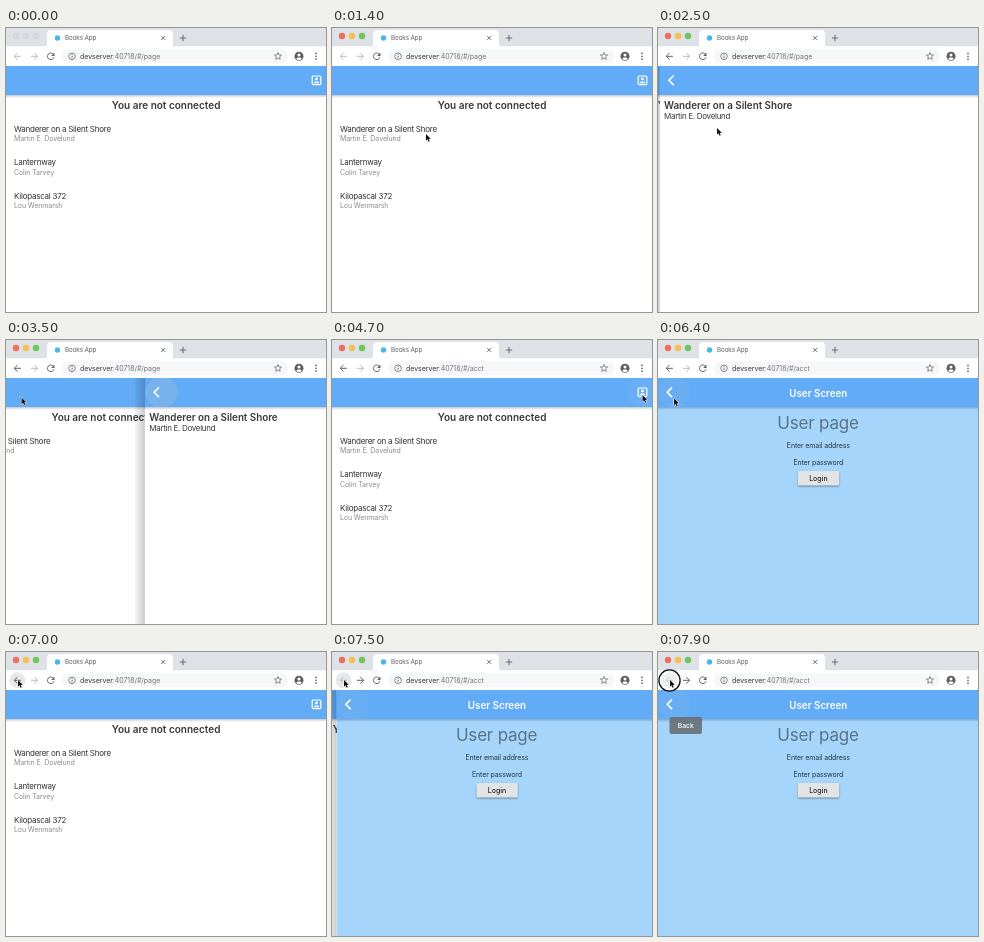
Animation, 320 px wide and 284 px high, one loop 8 s. Source, as an HTML page with a canvas:

```html
<!DOCTYPE html>
<html lang="en">
<head>
<meta charset="utf-8">
<title>Books App</title>
<style>
html, body { margin: 0; width: 100%; height: 100%; overflow: hidden; background: #fff; }
canvas { display: block; width: 320px; height: 284px; }
</style>
</head>
<body>
<canvas id="stage"></canvas>
<script>
const W = 320, H = 284, LOOP = 8000, STEP = 100;
const BAR_TOP = 38, BAR_H = 29;
const BLUE = '#62abf6', SKY = '#a6d5fc';
const canvas = document.getElementById('stage');
const dpr = window.devicePixelRatio || 1;
canvas.width = W * dpr;
canvas.height = H * dpr;
const c = canvas.getContext('2d');

const books = [
  ['Wanderer on a Silent Shore', 'Martin E. Dovelund'],
  ['Lanternway', 'Colin Tarvey'],
  ['Kilopascal 372', 'Lou Wenmarsh']
];

// Pointer stops: time, x, y
const stops = [
  [0, 160, 300], [100, 159, 274], [300, 152, 153], [500, 152, 153],
  [800, 132, 97], [900, 132, 97], [1400, 94, 106], [1800, 94, 106],
  [2100, 59, 100], [2700, 59, 100], [3200, 15.5, 57.5], [3600, 15.5, 57.5],
  [4000, 297, 74], [4100, 297, 74], [4400, 310.5, 55], [4900, 310.5, 55],
  [5300, 168, 62], [5400, 168, 62], [5900, 16, 58.5], [6500, 16, 58.5],
  [6900, 12, 28], [8000, 12, 28]
];

// Page visits: entry start, entry length, exit start, exit length
const visits = [
  { draw: detailPage, at: 2330, len: 190, out: 3433, outLen: 400 },
  { draw: userPage, at: 4750, len: 450, out: 6430, outLen: 400 },
  { draw: userPage, at: 7150, len: 450, out: 9000, outLen: 400 }
];

const within = (t, a, b) => t >= a && t < b;

// cubic-bezier(.35, .91, .33, .97)
function slide(s) {
  if (s <= 0) return 0;
  if (s >= 1) return 1;
  const axis = (u, a, b) => 3 * a * u * (1 - u) ** 2 + 3 * b * u * u * (1 - u) + u ** 3;
  let lo = 0, hi = 1;
  for (let i = 0; i < 20; i++) {
    const mid = (lo + hi) / 2;
    if (axis(mid, .35, .33) < s) lo = mid; else hi = mid;
  }
  return axis(lo, .91, .97);
}

function pointerAt(t) {
  let i = 1;
  while (i < stops.length - 1 && stops[i][0] <= t) i++;
  const [t0, x0, y0] = stops[i - 1], [t1, x1, y1] = stops[i];
  const s = (t - t0) / (t1 - t0), e = s * s * (3 - 2 * s);
  return [x0 + (x1 - x0) * e, y0 + (y1 - y0) * e];
}

function text(str, x, y, size, color, { weight = 400, gap = 0, align = 'left' } = {}) {
  c.font = `${weight} ${size}px Inter, "Open Sans", sans-serif`;
  c.letterSpacing = gap + 'px';
  c.textAlign = align;
  c.fillStyle = color;
  c.fillText(str, x, y);
  return c.measureText(str).width;
}

function rect(x, y, w, h, color) {
  c.fillStyle = color;
  c.fillRect(x, y, w, h);
}

function pill(x, y, w, h, r, color) {
  c.beginPath();
  c.roundRect(x, y, w, h, r);
  c.fillStyle = color;
  c.fill();
}

function disc(x, y, r, color) {
  c.beginPath();
  c.arc(x, y, r, 0, 7);
  c.fillStyle = color;
  c.fill();
}

function ring(x, y, r, color, width, from = 0, to = Math.PI * 2) {
  c.beginPath();
  c.arc(x, y, r, from, to);
  c.strokeStyle = color;
  c.lineWidth = width;
  c.stroke();
}

function line(color, width, ...pts) {
  c.beginPath();
  for (let i = 0; i < pts.length; i += 2) c.lineTo(pts[i], pts[i + 1]);
  c.strokeStyle = color;
  c.lineWidth = width;
  c.stroke();
}

function arrow(x, y, dir, color) {
  line(color, 1, x - 3.4 * dir, y, x + 3.2 * dir, y);
  line(color, 1, x, y - 3.3, x + 3.3 * dir, y, x, y + 3.3);
}

function star(x, y, r) {
  const pts = [];
  for (let i = 0; i <= 10; i++) {
    const a = i * Math.PI / 5 - Math.PI / 2, d = i % 2 ? r * .45 : r;
    pts.push(x + d * Math.cos(a), y + d * Math.sin(a));
  }
  line('#6b6f74', .8, ...pts);
}

function browser(t) {
  const active = t >= 1100;
  const ink = '#5c6065', faint = '#b9bcc0';
  rect(0, 0, W, 18.5, '#dee1e6');
  const lights = active ? ['#ee6d62', '#f3c04f', '#6cc65c'] : ['#d5d8dc', '#d5d8dc', '#d5d8dc'];
  lights.forEach((color, i) => {
    disc(10 + i * 10, 8, 3.2, color);
    if (!active) ring(10 + i * 10, 8, 3, '#cdd0d4', .5);
  });
  pill(41, 2, 126, 20, [4, 4, 0, 0], '#fff');
  disc(51.5, 10, 2.7, '#47b8ec');
  text('Books App', 59, 12.3, 6.3, '#5a5d61', { gap: -.1 });
  line(ink, .9, 155.2, 7.9, 159.2, 11.9);
  line(ink, .9, 159.2, 7.9, 155.2, 11.9);
  line(ink, .9, 173.8, 10, 180.2, 10);
  line(ink, .9, 177, 6.8, 177, 13.2);

  rect(0, 18.5, W, BAR_TOP - 18.5, '#fff');
  if (t >= 6800) disc(11.5, 28.3, 8, '#e6e8ea');
  arrow(11.5, 28.3, -1, within(t, 2400, 7200) ? ink : faint);
  arrow(28.3, 28.3, 1, t >= 7200 ? ink : faint);
  ring(44.8, 28.3, 3.2, ink, 1, .3, 5.5);
  c.beginPath();
  c.moveTo(48.5, 24.5);
  c.lineTo(48.5, 28);
  c.lineTo(45.1, 28);
  c.fillStyle = ink;
  c.fill();

  pill(56, 21, 226, 14.5, 7.25, '#f6f7f8');
  ring(66, 28.3, 3.3, '#6b6f74', .8);
  rect(65.6, 27.7, .9, 2.5, '#6b6f74');
  rect(65.6, 26.2, .9, .9, '#6b6f74');
  const account = within(t, 4700, 6500) || t >= 7200;
  const w = text('devserver', 74, 30.8, 7, '#3b3d40', { gap: -.05 });
  text(':40718/#/' + (account ? 'acct' : 'page'), 74 + w, 30.8, 7, '#6f7378', { gap: -.05 });
  star(272, 28.3, 3.8);

  disc(293, 28.3, 4.5, '#5c6065');
  disc(293, 26.9, 1.5, '#fff');
  c.beginPath();
  c.ellipse(293, 30.7, 2.6, 1.3, 0, 0, 7);
  c.fillStyle = '#fff';
  c.fill();
  for (const dy of [-2.9, 0, 2.9]) disc(310, 28.3 + dy, .85, '#5c6065');
}

function appBar() {
  const bottom = BAR_TOP + BAR_H;
  const g = c.createLinearGradient(0, bottom, 0, bottom + 3);
  g.addColorStop(0, 'rgba(0,0,0,.22)');
  g.addColorStop(1, 'rgba(0,0,0,0)');
  rect(0, bottom, W, 3, g);
  rect(0, BAR_TOP, W, BAR_H, BLUE);
}

function chevron(glow) {
  if (glow) disc(16.5, 52.3, 16, `rgba(190,200,205,${glow})`);
  line('#fff', 1.6, 14, 47.5, 9.2, 52.3, 14, 57.1);
}

function listPage(t) {
  rect(0, BAR_TOP, W, H - BAR_TOP, '#fff');
  appBar();
  if (within(t, 4300, 5000)) disc(310.5, 52.3, 15, 'rgba(255,255,255,.05)');
  c.strokeStyle = '#fff';
  c.lineWidth = 1.2;
  c.beginPath();
  c.roundRect(306.2, 48, 8.6, 8.6, 1);
  c.stroke();
  disc(310.5, 51, 1.4, '#fff');
  pill(307.9, 53.4, 5.2, 1.9, [1.5, 1.5, 0, 0], '#fff');
  text('You are not connected', 160.1, 81, 10, '#37393b', { weight: 600, align: 'center' });
  books.forEach(([title, author], i) => {
    const y = 104 + i * 33.3;
    text(title, 8, y, 8, '#303030', { gap: -.24 });
    text(author, 8, y + 9.2, 7, '#8a8a8a', { gap: -.1 });
  });
}

function detailPage(t) {
  rect(0, BAR_TOP, W, H - BAR_TOP, '#fff');
  appBar();
  chevron(t >= 3100 ? .22 : 0);
  text(books[0][0], 4.3, 81, 9.8, '#37393b', { weight: 600 });
  text(books[0][1], 4.3, 91.2, 8, '#383838', { gap: -.3 });
}

function userPage(t) {
  const mid = { align: 'center' };
  rect(0, BAR_TOP, W, H - BAR_TOP, SKY);
  appBar();
  chevron(within(t, 5800, 6900) || t >= 7500 ? .08 : 0);
  text('User Screen', 160.3, 56.6, 9.8, '#fff', { weight: 600, ...mid });
  text('User page', 160, 88.6, 17, '#587489', { gap: -.2, ...mid });
  text('Enter email address', 160.3, 107.6, 7, '#26333d', { gap: -.12, ...mid });
  text('Enter password', 160.3, 124.8, 7, '#26333d', { gap: -.12, ...mid });
  c.save();
  c.shadowColor = 'rgba(0,0,0,.4)';
  c.shadowBlur = 2 * dpr;
  c.shadowOffsetY = dpr;
  pill(139.8, 131, 41.4, 14.4, 1, '#e2e3e4');
  c.restore();
  text('Login', 160.4, 140.8, 7, '#222', { weight: 500, ...mid });
  if (within(t, 6000, 6200) || t >= 7600) {
    pill(11.5, 65, 32.5, 17, 2, 'rgba(104,113,121,.92)');
    text('Back', 27.8, 76, 6.8, '#fff', { weight: 500, ...mid });
  }
}

function shifted(x, draw, t) {
  c.save();
  c.translate(x, 0);
  draw(t);
  c.restore();
}

function pages(t) {
  const visit = visits.find(v => within(t, v.at, v.out + v.outLen));
  const cover = visit
    ? slide((t - visit.at) / visit.len) - slide((t - visit.out) / visit.outLen)
    : 0;
  c.save();
  c.beginPath();
  c.rect(0, BAR_TOP, W, H - BAR_TOP);
  c.clip();
  shifted(-cover * W / 3, listPage, t);
  if (cover > 0) {
    const x = (1 - cover) * W;
    const g = c.createLinearGradient(x - 10, 0, x, 0);
    g.addColorStop(0, 'rgba(0,0,0,.04)');
    g.addColorStop(1, 'rgba(0,0,0,.2)');
    rect(x - 10, BAR_TOP, 10, H - BAR_TOP, g);
    c.beginPath();
    c.rect(x, BAR_TOP, W, H);
    c.clip();
    shifted(x, visit.draw, t);
  }
  c.restore();
}

function pointer(t) {
  if (t < 100) return;
  const [x, y] = pointerAt(t);
  const pressed = [[2200, 2400], [3300, 3400], [4500, 4700], [6200, 6300], [7900, 8000]];
  if (pressed.some(([a, b]) => within(t, a, b))) {
    disc(x - .5, y + .5, 10.6, 'rgba(255,255,255,.35)');
    ring(x - .5, y + .5, 10.6, '#111', 1.3);
  }
  c.save();
  c.translate(x, y);
  c.scale(.8, .8);
  c.beginPath();
  const outline = [[0, 0], [0, 8.3], [1.9, 6.6], [3.2, 9.6], [4.7, 9], [3.4, 6.1], [5.9, 6]];
  outline.forEach(p => c.lineTo(...p));
  c.closePath();
  c.lineJoin = 'round';
  c.strokeStyle = '#fff';
  c.lineWidth = 1.2;
  c.stroke();
  c.fillStyle = '#111';
  c.fill();
  c.restore();
}

function frame(now) {
  const t = Math.floor((now % LOOP) / STEP) * STEP;
  c.setTransform(dpr, 0, 0, dpr, 0, 0);
  rect(0, 0, W, H, '#fff');
  browser(t);
  pages(t);
  pointer(t);
  requestAnimationFrame(tick);
}

const start = performance.now();
function tick() {
  frame(performance.now() - start);
}
tick();
</script>
</body>
</html>
```
